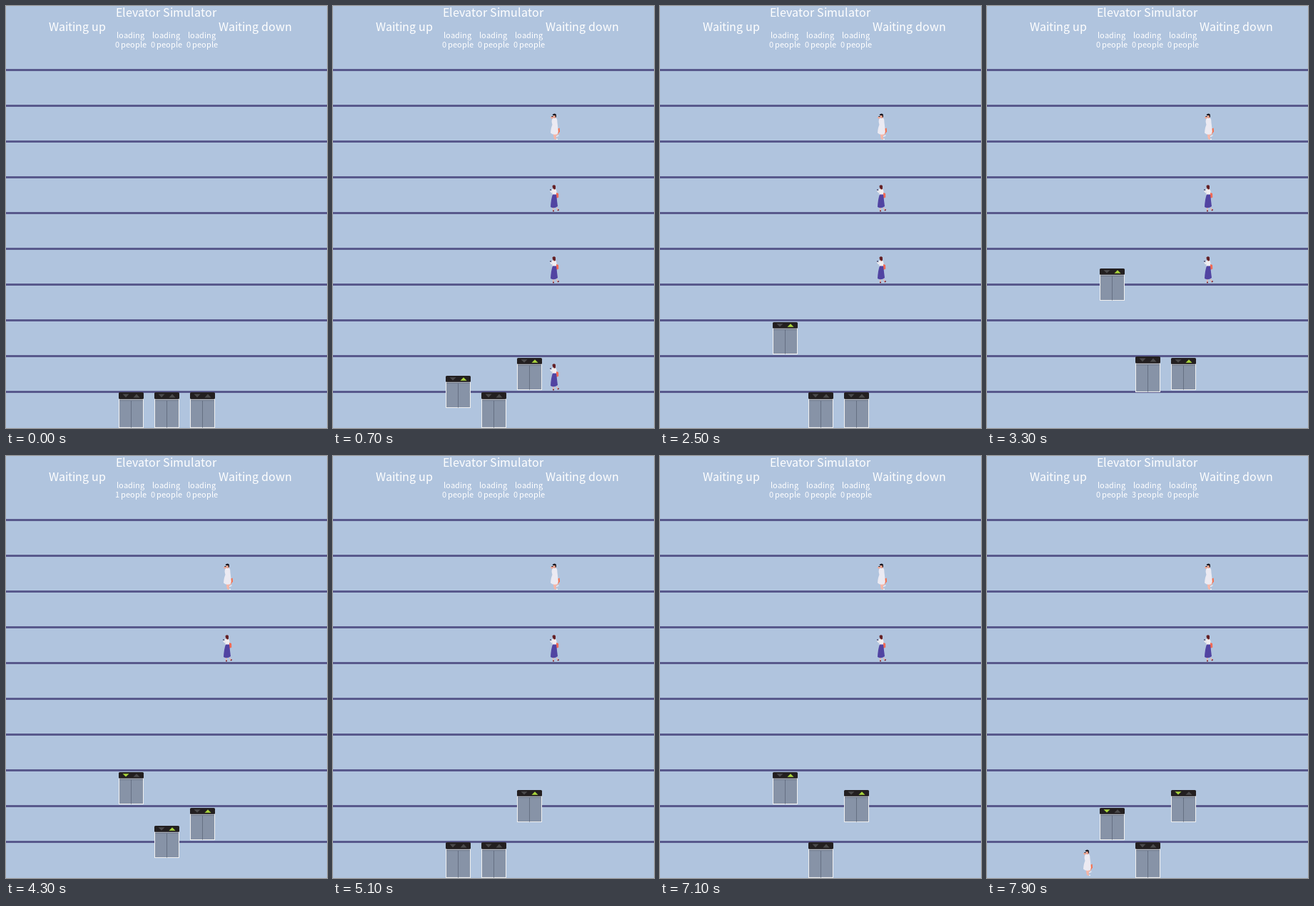
These frames come from a looping animation (450 by 590 pixels, 8 s). An HTML page:

```html
<!DOCTYPE html>
<html lang="en">
<head>
<meta charset="utf-8">
<title>Elevator Simulator</title>
<style>
  html, body { margin: 0; width: 100%; height: 100%; overflow: hidden; background: #b0c4de; }
  svg { display: block; }
  text { fill: #fff; white-space: pre; font-family: "Noto Sans CJK SC", "Noto Sans CJK JP", "Noto Sans", sans-serif; }
  .arrow { fill: #4b4a4b; }
  .lit { fill: #a9d53c; }
</style>
</head>
<body>
<svg id="stage" width="450" height="590" viewBox="0 0 450 590">
  <defs>
    <g id="white">
      <path d="M5 4L2 4.5 1 6.5 4 8z" fill="#f6a58e"/>
      <path d="M4.5 27L5.5 34 6.5 36.5H10L8.5 34 9 31 12 29.5 11.5 27z" fill="#f7b5a6"/>
      <path d="M9 32.5l3.5-1.5M9 36.2h2" stroke="#fff" fill="none"/>
      <path d="M11 21.5L13.6 20.5 14 25.5 11.5 29z" fill="#f5714f"/>
      <path d="M4 7L9 6.5Q11 9 10.5 13L11.5 22Q12.5 26 10.5 29Q5 31 1 27.5Q1.5 20 3.5 16Q1.5 10 4 7z" fill="#eceaf2"/>
      <path d="M5 2.5H8.5V6L7 7.2 5 6z" fill="#f6a58e"/>
      <path d="M3.5 2Q6 -.8 8.8 1.5L9 5 7.8 6 7.5 3 4.5 3z" fill="#17151c"/>
      <path d="M2.5 4.5h2" stroke="#17151c"/>
    </g>
    <g id="purple">
      <path d="M5 32L4.5 36.5M9.5 32L11.5 36" stroke="#f2b3a4" stroke-width="1.3"/>
      <path d="M4 36.5h2M11 36l1.6-1.5" stroke="#7c1c26" stroke-width="1.6"/>
      <path d="M4 6.5L2.2 10.5.5 8" stroke="#f1eef0" stroke-width="1.3" fill="none"/>
      <path d="M.2 7h1.5" stroke="#34294a" stroke-width="1.5"/>
      <path d="M3 6.5Q6 5 9 7L10 14H3.5z" fill="#f1eef0"/>
      <path d="M9 11L12 12 12.3 17.5 9 19z" fill="#f26a55"/>
      <path d="M4 13.5H9L11 30Q6 34 1 31Q1.5 20 4 13.5z" fill="#5144a2"/>
      <path d="M4.5 2.5H7.5V6.5H5z" fill="#e79a86"/>
      <path d="M3.5 1.5Q6-.8 8 1.5L8 5.5 6.5 6.5 4 4.5z" fill="#642126"/>
    </g>
  </defs>
  <path id="floors" stroke="#58598c" stroke-width="3"/>
  <g id="people"></g>
  <g id="lifts"></g>
  <g id="labels"></g>
</svg>
<script>
const STEP = 100, STEPS = 80, FLOOR = 50, GROUND = 540;
const $ = id => document.getElementById(id);
const pen = document.createElement('canvas').getContext('2d');

function add(parent, tag, attrs) {
  const el = document.createElementNS('http://www.w3.org/2000/svg', tag);
  for (const key in attrs) el.setAttribute(key, attrs[key]);
  return parent.appendChild(el);
}

// Centred text whose glyphs advance by whole pixels.
function label(cx, y, size, string) {
  const el = add($('labels'), 'text', { y, 'font-size': size });
  pen.font = size + 'px ' + getComputedStyle(el).fontFamily;
  const widths = [...string].map(ch => Math.round(pen.measureText(ch).width));
  let x = Math.floor(cx - widths.reduce((a, b) => a + b) / 2);
  el.setAttribute('x', widths.map(w => (x += w) - w).join(' '));
  el.textContent = string;
  return el;
}

let lines = '';
for (let y = 89.5; y < GROUND; y += FLOOR) lines += `M0 ${y}H450`;
$('floors').setAttribute('d', lines);

label(225, 15, 16, 'Elevator Simulator');
label(100, 35, 16, 'Waiting up');
label(350, 35, 16, 'Waiting down');

// trips: [departure step, destination floor]; loads: [step, passengers]
const lifts = [
  { x: 158,
    trips: [[6, 1], [13, 0], [21, 2], [30, 4], [39, 0], [60, 2], [71, 3], [75, 0]],
    loads: [[37, 1], [49, 0]] },
  { x: 208,
    trips: [[13, 1], [19, 0], [27, 1], [34, 0], [42, 1], [47, 0], [58, 1], [65, 0]],
    loads: [[76, 3]] },
  { x: 258,
    trips: [[5, 1], [12, 0], [27, 1], [33, 1.5], [35, 0], [41, 1], [50, 2], [53, 0], [68, 2], [78, 0]],
    loads: [[9, 1], [16, 0]] }
];

// [figure, x, floor, first step, end step]
const people = [
  ['white', 303, 8, 3, 80],
  ['purple', 303, 6, 3, 80],
  ['purple', 303, 4, 3, 37],
  ['purple', 303, 1, 3, 9],
  ['purple', 133, 0, 74, 76],
  ['white', 118, 0, 74, 76],
  ['purple', 103, 0, 74, 76],
  ['white', 88, 0, 74, 76],
  ['white', 133, 0, 76, 80]
].map(([figure, x, floor, from, to]) => ({
  from, to,
  el: add($('people'), 'use', { href: '#' + figure, x: x + 1, y: GROUND + 10 - floor * FLOOR })
}));

for (const lift of lifts) {
  const g = lift.el = add($('lifts'), 'g', {});
  add(g, 'rect', { x: .5, y: 9, width: 34, height: 35.5, fill: '#8793a7', stroke: '#f0f0f0' });
  add(g, 'path', { d: 'M1 10.3H34M17.5 10V44.5', stroke: '#667083', fill: 'none' });
  add(g, 'rect', { width: 35, height: 8.8, rx: 1.6, fill: '#231f20' });
  lift.down = add(g, 'path', { d: 'M5.5 2.3H14.5L10 6.6z' });
  lift.up = add(g, 'path', { d: 'M20.5 6.8H29.5L25 2.3z' });
  const cx = lift.x + 17;
  label(cx, 45, 11, 'loading');
  lift.count = label(cx, 58, 11, '0 people');
}

function pose(trips, step) {
  let floor = 0, dir = 0, at = 0;
  for (const [start, to] of trips) {
    if (step < start) break;
    const hops = 2 * Math.abs(to - floor), done = step - start;
    dir = done <= hops ? Math.sign(to - floor) : 0;
    at = dir ? floor + dir * done / 2 : to;
    floor = to;
  }
  return { at, dir };
}

function draw(step) {
  for (const lift of lifts) {
    const { at, dir } = pose(lift.trips, step);
    const y = GROUND - at * FLOOR;
    lift.el.setAttribute('transform', dir
      ? `translate(${lift.x} ${y + 2})`
      : `translate(${lift.x} ${y}) scale(1 ${50 / 45})`);
    lift.up.setAttribute('class', dir > 0 ? 'lit' : 'arrow');
    lift.down.setAttribute('class', dir < 0 ? 'lit' : 'arrow');
    const load = lift.loads.filter(([t]) => t <= step).pop();
    lift.count.textContent = (load ? load[1] : 0) + ' people';
  }
  for (const p of people)
    p.el.setAttribute('visibility', step >= p.from && step < p.to ? 'visible' : 'hidden');
}

function tick() {
  draw(Math.floor(performance.now() / STEP) % STEPS);
  requestAnimationFrame(tick);
}
tick();
</script>
</body>
</html>
```
